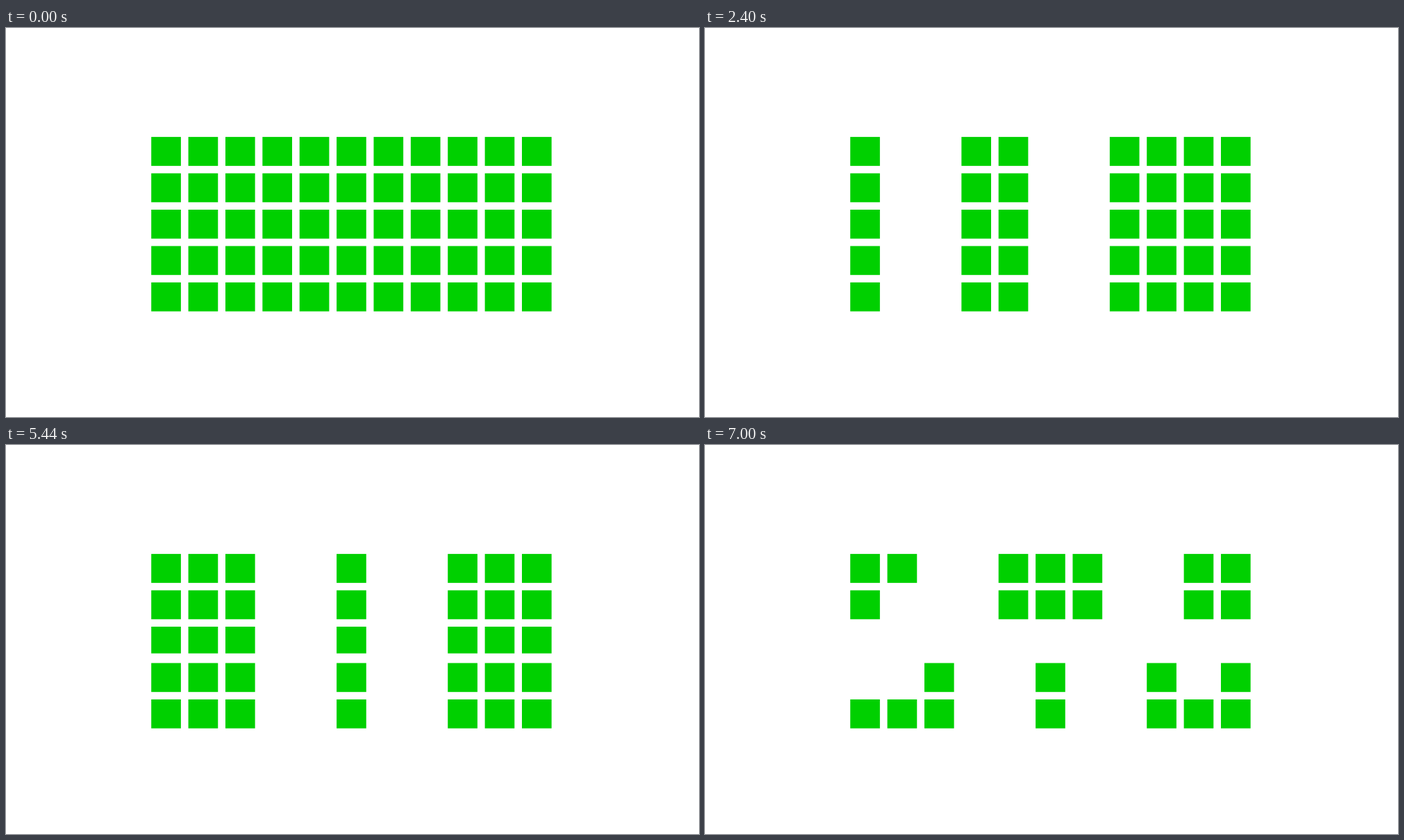
An HTML page with a canvas for the animation above (8 s loop, 998 by 561 pixels).

```html
<!DOCTYPE html>
<html lang="en">
<head>
<meta charset="utf-8">
<title>Sliding tiles</title>
<style>
  html, body { margin: 0; width: 100%; height: 100%; overflow: hidden; background: #fff; }
  canvas { display: block; }
</style>
</head>
<body>
<canvas id="stage" width="998" height="561"></canvas>
<script>
const canvas = document.getElementById('stage');
const ctx = canvas.getContext('2d');
const LOOP = 8000, TICK = 40, SLIDE = 160;
const COLS = 11, ROWS = 5;
const LEFT = 209.2, TOP = 157.1, CELL_W = 53.38, CELL_H = 52.45;
const GAP = 10.7, PAD = 5.9;

const move = (dx, dy, hold = 0) => ({ dx, dy, hold });
const stay = move(0, 0);
const left = move(-2, 0), right = move(2, 0), lateRight = move(2, 0, 0.25);
const up = move(0, -1), down = move(0, 1);

// Each step decides where the tile at column c, row r goes; tiles that meet merge
const steps = [
  { start: 240, rule: c => c === 6 || c === 7 ? left : stay },
  { start: 2240, rule: c => c === 5 ? right : c === 1 || c === 2 ? lateRight : stay },
  { start: 4160, rule: c => c === 3 || c === 4 || c === 7 ? left : stay },
  { start: 5400, rule: (c, r) => r === 2 ? up : stay },
  { start: 6840, rule: (c, r) => {
    if (r < 2 && c === 2) return right;
    if (r < 2 && c === 8) return left;
    if (r === 1 && c === 1) return up;
    if (r === 3 && (c < 2 || c === 9)) return down;
    return stay;
  } }
];

function plan() {
  let cells = Array.from({ length: COLS * ROWS }, (_, i) => i);
  for (const step of steps) {
    step.tiles = cells.map(i => {
      const c = i % COLS, r = Math.floor(i / COLS);
      return { c, r, ...step.rule(c, r) };
    });
    cells = [...new Set(step.tiles.map(t => (t.r + t.dy) * COLS + t.c + t.dx))];
  }
}

// Symmetric ease in and out
function ease(p) {
  const a = p ** 1.56, b = (1 - p) ** 1.56;
  return a / (a + b);
}

function gutters() {
  ctx.fillStyle = '#fff';
  for (let c = 0; c <= COLS; c++) {
    ctx.fillRect(LEFT + c * CELL_W - GAP, 0, GAP, canvas.height);
  }
  for (let r = 0; r <= ROWS; r++) {
    ctx.fillRect(0, TOP + r * CELL_H - GAP, canvas.width, GAP);
  }
}

function draw(time) {
  const t = Math.floor((time % LOOP) / TICK) * TICK;
  const step = steps.findLast(s => t >= s.start) || steps[0];
  const p = Math.min(1, Math.max(0, (t - step.start) / SLIDE));

  ctx.fillStyle = '#fff';
  ctx.fillRect(0, 0, canvas.width, canvas.height);
  ctx.fillStyle = '#00d000';
  for (const { c, r, dx, dy, hold } of step.tiles) {
    const k = p > hold ? ease(p) : 0;
    ctx.fillRect(LEFT - PAD + (c + dx * k) * CELL_W,
                 TOP - PAD + (r + dy * k) * CELL_H, CELL_W, CELL_H);
  }
  gutters();
}

let begin;
function frame() {
  const now = performance.now();
  begin ??= now;
  draw(now - begin);
  requestAnimationFrame(frame);
}

plan();
frame();
</script>
</body>
</html>
```
